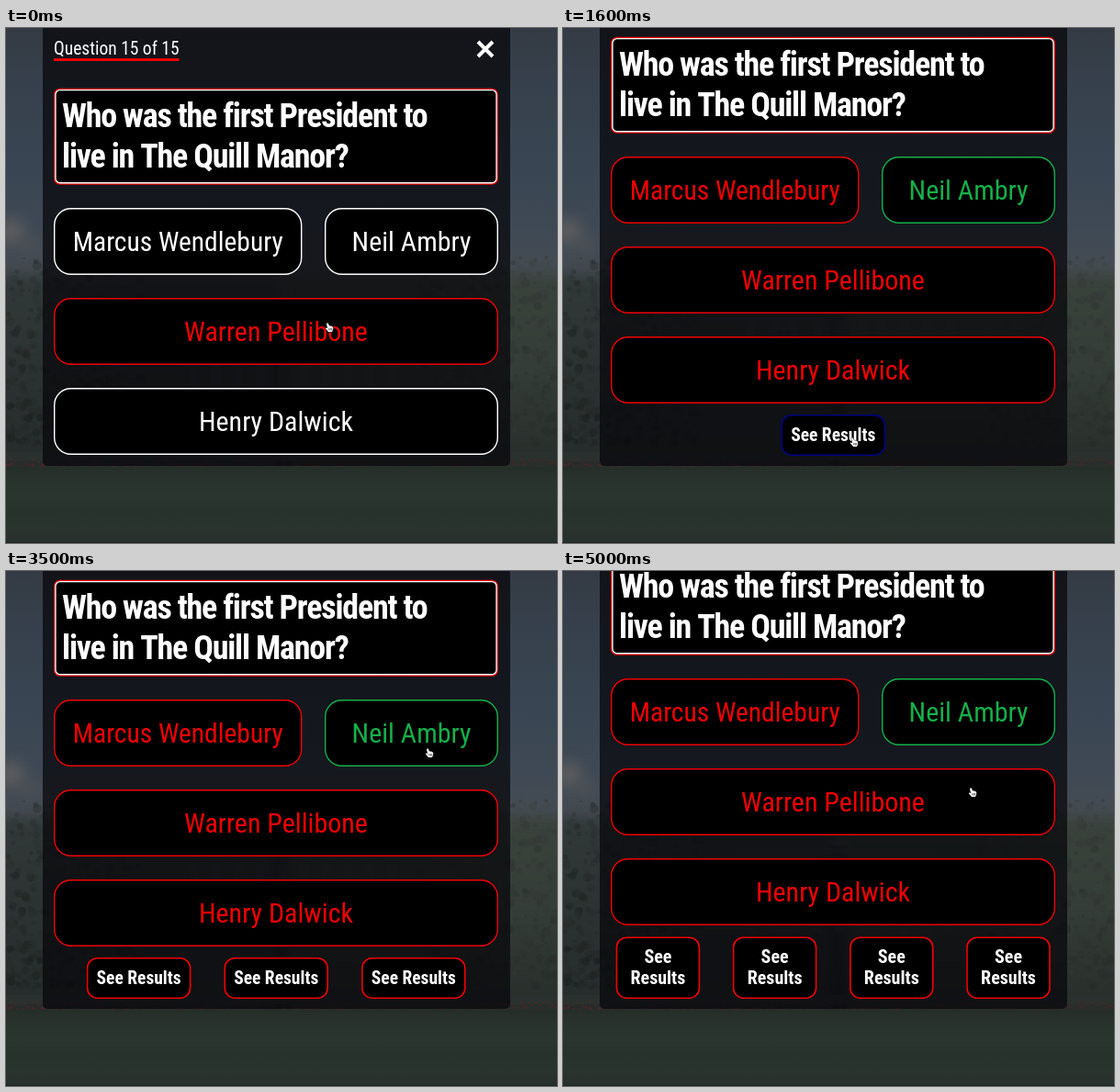
Write an HTML page with a canvas that moves like this. It is 600x561 px and loops after 5100 ms.

```html
<!DOCTYPE html>
<html lang="en">
<head>
<meta charset="utf-8">
<title>Quiz</title>
<style>
  html, body { margin: 0; width: 100%; height: 100%; overflow: hidden; background: #29332e; }
  canvas { display: block; }
</style>
</head>
<body>
<canvas id="stage" width="600" height="561"></canvas>
<script>
const W = 600, H = 561, LOOP = 5100, STEP = 100;
const RED = '#f00000', GREEN = '#16b04a', NAVY = '#000084';
const ctx = document.getElementById('stage').getContext('2d');

const ANSWERS = [
  { label: 'Marcus Wendlebury', x: 52.7, y: 196.7, w: 269 },
  { label: 'Neil Ambry', x: 347.7, y: 196.7, w: 187.6, right: true },
  { label: 'Warren Pellibone', x: 52.7, y: 294.7, w: 482.6 },
  { label: 'Henry Dalwick', x: 52.7, y: 392.7, w: 482.6 }
];
const QUESTION = ['Who was the first President to', 'live in The Quill Manor?'];

// Times at which another "See Results" button appears
const CLICKS = [200, 2700, 3500, 4200];

// Mouse path: time, x, y
const PATH = [
  [0, 352, 326], [100, 352, 326], [300, 340, 345], [700, 338, 350], [1200, 318, 447],
  [1300, 317, 451], [1600, 317, 451], [2100, 461, 198], [4400, 461, 198], [5000, 446, 241]
];

function mouseAt(t) {
  const i = PATH.findIndex(p => p[0] > t);
  if (i < 0) return PATH[PATH.length - 1].slice(1);
  const [t0, x0, y0] = PATH[i - 1], [t1, x1, y1] = PATH[i];
  const u = (t - t0) / (t1 - t0), k = u * u * (3 - 2 * u);
  return [x0 + (x1 - x0) * k, y0 + (y1 - y0) * k];
}

// Dimmed garden scene with the translucent quiz panel on top
function paintBackdrop() {
  const layer = document.createElement('canvas');
  layer.width = W;
  layer.height = H;
  const c = layer.getContext('2d');
  let seed = 7;
  const rnd = () => (seed = seed * 16807 % 2147483647) / 2147483647;
  const fade = (y0, y1, stops) => {
    const g = c.createLinearGradient(0, y0, 0, y1);
    stops.forEach((s, i) => g.addColorStop(i / (stops.length - 1), s));
    return g;
  };
  const rect = (color, x, y, w, h) => { c.fillStyle = color; c.fillRect(x, y, w, h); };
  const dot = (color, x, y, r) => {
    c.fillStyle = color;
    c.beginPath();
    c.arc(x, y, r, 0, 7);
    c.fill();
  };

  rect(fade(0, 290, ['#343b44', '#37414d', '#394553', '#3f4955', '#484c50']), 0, 0, W, 300);

  c.filter = 'blur(7px)';
  dot('#5a5b5d', 6, 222, 15);
  dot('#4d5155', 25, 236, 10);

  // Trees around the house
  rect(fade(260, 470, ['#323939', '#2b3231', '#262c2b']), -20, 268, 320, 240);
  rect(fade(260, 470, ['#3a423c', '#353d38', '#272e2b']), 300, 268, 320, 240);
  c.filter = 'none';
  for (let i = 0; i < 900; i++) {
    const y = 250 + rnd() ** 0.8 * 205, left = i % 2;
    const x = left ? rnd() * 150 : 450 + rnd() * 150;
    const v = Math.round((left ? 36 : 48) - (y - 250) / 16 + rnd() * 14);
    dot(`rgba(${v},${v + 6},${v + 3},.45)`, x, y, 1 + rnd() * 4);
  }
  rect('rgba(68,70,72,.4)', 190, 302, 215, 7);
  for (let x = 200; x < 420; x += 24) rect('rgba(68,70,72,.3)', x, 318, 9, 76);

  // Flower bed and lawn
  rect('#2a302d', 0, 462, W, 10);
  for (let i = 0; i < 420; i++) dot('rgba(86,40,42,.4)', rnd() * W, 470 + rnd() * 8, 1.3);
  rect(fade(478, H, ['#252d29', '#29332e', '#2b3530', '#28322d', '#2a342f', '#27302c']), 0, 478, W, 83);
  rect('#1d2523', 0, H - 1, W, 1);

  c.fillStyle = 'rgba(8,8,11,.74)';
  c.beginPath();
  c.roundRect(40, -10, 509, 487, 5);
  c.fill();
  return layer;
}

const backdrop = paintBackdrop();

// Selects the largest font up to the given size that keeps the text inside its room
function useFont(weight, size, text, room) {
  do {
    ctx.font = `${weight} condensed ${size}px "Roboto Condensed", Roboto, sans-serif`;
    size -= 0.5;
  } while (ctx.measureText(text).width > room && size > 8);
}

function label(text, x, y, size, color, room, weight = 400) {
  useFont(weight, size, text, room);
  ctx.fillStyle = color;
  ctx.fillText(text, x, y);
}

function box(x, y, w, h, radius, border, line) {
  ctx.beginPath();
  ctx.roundRect(x, y, w, h, radius);
  ctx.fillStyle = '#000';
  ctx.fill();
  ctx.strokeStyle = border;
  ctx.lineWidth = line;
  ctx.stroke();
}

function drawHeader() {
  ctx.textAlign = 'left';
  label('Question 15 of 15', 52, 29, 20, '#fff', 138);
  ctx.fillStyle = RED;
  ctx.fillRect(52, 33, ctx.measureText('Question 15 of 15').width, 3);
  ctx.strokeStyle = '#fff';
  ctx.lineWidth = 4;
  ctx.beginPath();
  ctx.moveTo(514, 15);
  ctx.lineTo(530, 31);
  ctx.moveTo(530, 15);
  ctx.lineTo(514, 31);
  ctx.stroke();
}

function drawQuestion() {
  box(52.7, 66.5, 482.6, 103.5, 6, RED, 1.5);
  box(53.9, 67.6, 480.2, 101.2, 5, '#fff', 1.4);
  ctx.textAlign = 'left';
  ctx.fillStyle = '#fff';
  ctx.letterSpacing = '-1.2px';
  useFont(900, 36, QUESTION[0], 411);
  QUESTION.forEach((line, i) => ctx.fillText(line, 61, 108 + i * 44));
  ctx.letterSpacing = '0px';
}

function drawResults(count, inside) {
  const tall = count > 3;
  const w = tall ? 90 : 112, h = tall ? 66 : 43.5, gap = tall ? 127.2 : 149.6;
  const y = 465.2 - h;
  const lines = tall ? ['See', 'Results'] : ['See Results'];
  let hit = false;
  for (let i = 0; i < count; i++) {
    const cx = 294.2 + (i - (count - 1) / 2) * gap;
    const over = inside(cx - w / 2, y, w, h);
    hit = hit || over;
    box(cx - w / 2, y, w, h, 11, over ? NAVY : RED, 1.6);
    lines.forEach((s, n) => label(s, cx, 450 - (lines.length - 1 - n) * 23, 20, '#fff', w - 18, 700));
  }
  return hit;
}

const HAND = new Path2D('M-2.5-4.5Q-1.5-5-1-4L0-1.5Q1-2.2 1.6-1.2Q2.6-1.8 3-.8Q4-1 4.2 0L4.2 2.5L3 5H-1L-4 1.5Q-4.2.2-3 .5L-1.8 1.2L-3-3.5Z');
const FINGERS = new Path2D('M-.2 1V3.5M1.3 1V3.5M2.8 1V3.5');
const ARROW = new Path2D('M0-5.5V4L2.2 1.6L3.7 5L5 4.4L3.6 1.2H6.2Z');

function drawCursor(x, y, hand) {
  const shape = hand ? HAND : ARROW;
  ctx.save();
  ctx.translate(x, y);
  ctx.lineJoin = 'round';
  ctx.lineWidth = 1;
  ctx.fillStyle = hand ? '#fff' : '#000';
  ctx.strokeStyle = hand ? '#000' : '#ddd';
  ctx.stroke(shape);
  ctx.fill(shape);
  ctx.lineWidth = 0.6;
  if (hand) ctx.stroke(FINGERS);
  ctx.restore();
}

function draw(t) {
  const count = CLICKS.filter(c => t >= c).length;
  const shift = count > 3 ? 79 : count ? 56 : 0;
  const [mx, my] = mouseAt(t);
  const inside = (x, y, w, h) => mx > x && mx < x + w && my > y && my < y + h;
  let hand = false;

  ctx.drawImage(backdrop, 0, 0);
  ctx.save();
  ctx.translate(0, -shift);
  drawHeader();
  drawQuestion();
  ctx.textAlign = 'center';
  for (const a of ANSWERS) {
    const over = inside(a.x, a.y - shift, a.w, 71.6);
    const color = count ? (a.right ? GREEN : RED) : over ? RED : '#fff';
    hand = hand || over;
    box(a.x, a.y, a.w, 71.6, 18, color, 1.4);
    label(a.label, a.x + a.w / 2, a.y + 46, 30, color, a.w - 40);
  }
  ctx.restore();
  ctx.textAlign = 'center';
  hand = drawResults(count, inside) || hand;
  drawCursor(mx, my, hand);
}

function tick(now) {
  draw(Math.floor(now % LOOP / STEP) * STEP);
  requestAnimationFrame(tick);
}
tick(performance.now());
</script>
</body>
</html>
```
